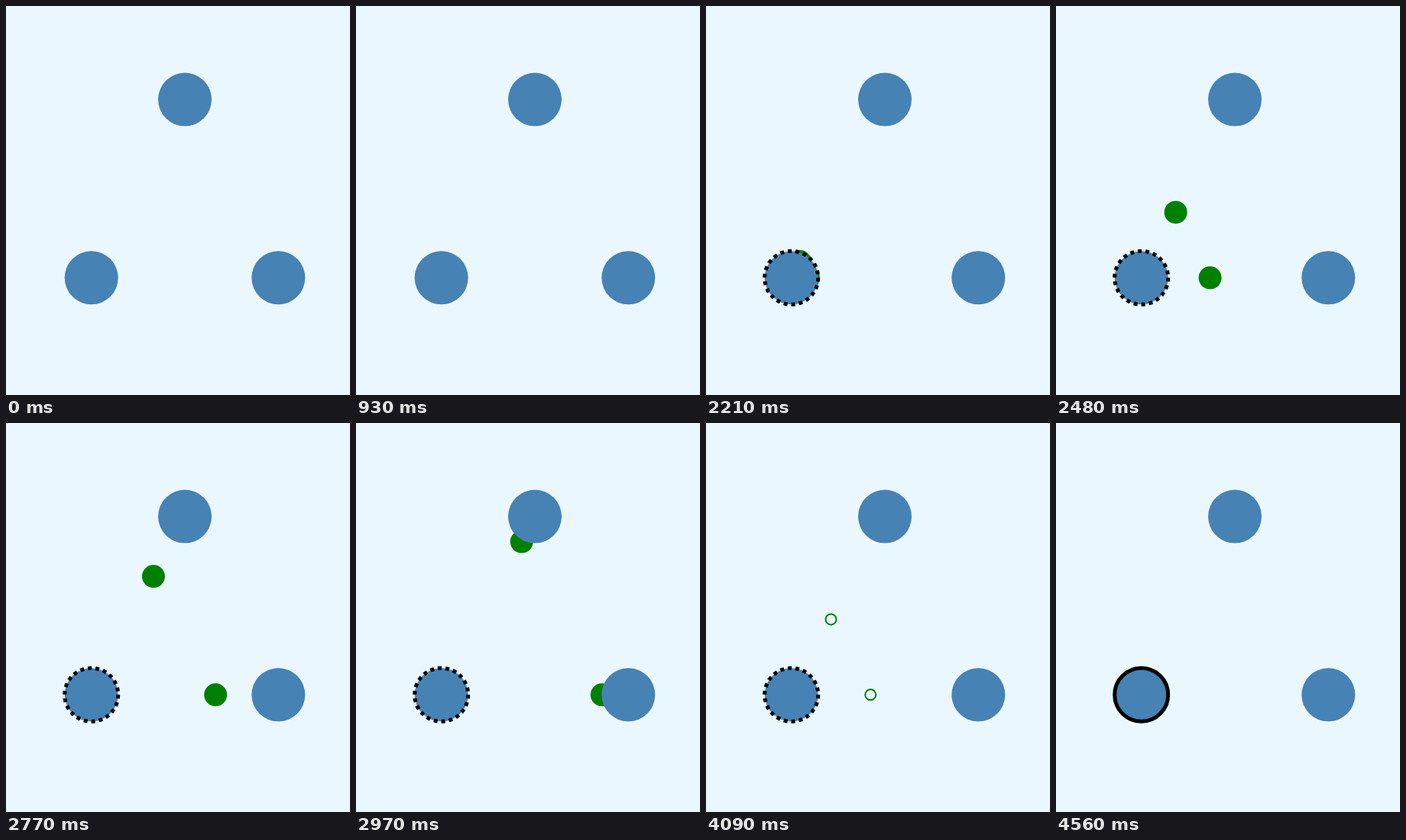
Recreate the animation shown at these times as an HTML page. Size 450 by 510 pixels, loop 6.65 s.

```html
<!DOCTYPE html>
<html lang="en">
<head>
<meta charset="utf-8">
<title>Leader election</title>
<style>
  html, body { margin: 0; width: 100%; height: 100%; overflow: hidden; background: #ebf7ff; }
  svg { display: block; }
  .node { fill: steelblue; stroke: black; stroke-width: 0; }
  .request { fill: green; }
  .reply { fill: none; stroke: green; stroke-width: 2; }
</style>
</head>
<body>
<svg id="stage" width="450" height="510" viewBox="0 0 450 510"></svg>
<script>
const LOOP = 6650;
const candidate = { x: 111.7, y: 356.3 };
const peers = [{ x: 234, y: 122.6 }, { x: 356.3, y: 356.3 }];

// [time in ms, share of the way travelled]
const requestTrack = [[2122, 0], [2210, 0.09], [2770, 0.663], [2870, 0.763], [3120, 1]];
const replyTrack = [[3536, 0], [3640, 0.108], [4090, 0.576], [4300, 0.743], [4560, 1]];
const ringStart = 915, ringEnd = 1170, electedAt = 4560;

const stage = document.getElementById("stage");

function addCircle(className, r, { x, y }) {
  const circle = document.createElementNS("http://www.w3.org/2000/svg", "circle");
  circle.setAttribute("class", className);
  circle.setAttribute("r", r);
  place(circle, x, y);
  return stage.appendChild(circle);
}

function place(circle, x, y) {
  circle.setAttribute("cx", x);
  circle.setAttribute("cy", y);
}

function progress(track, t) {
  const next = track.findIndex(([time]) => time > t);
  if (next < 1) return null;
  const [t0, p0] = track[next - 1], [t1, p1] = track[next];
  return p0 + (p1 - p0) * (t - t0) / (t1 - t0);
}

function easeInOutCubic(u) {
  return u < 0.5 ? 4 * u ** 3 : 1 - 4 * (1 - u) ** 3;
}

// Messages come first so that they pass beneath the nodes.
const messages = peers.flatMap(peer => [
  { circle: addCircle("request", 15, candidate), from: candidate, to: peer, track: requestTrack },
  { circle: addCircle("reply", 7, peer), from: peer, to: candidate, track: replyTrack }
]);
peers.forEach(peer => addCircle("node", 35, peer));
const ring = addCircle("node", 35, candidate);

function draw(t) {
  for (const { circle, from, to, track } of messages) {
    const p = progress(track, t);
    circle.style.display = p === null ? "none" : "";
    place(circle, from.x + (to.x - from.x) * p, from.y + (to.y - from.y) * p);
  }
  const grown = Math.min(1, Math.max(0, (t - ringStart) / (ringEnd - ringStart)));
  ring.style.strokeWidth = 5 * easeInOutCubic(grown);
  ring.style.strokeDasharray = t < electedAt ? "5 5" : "none";
}

function tick() {
  draw(performance.now() % LOOP);
  requestAnimationFrame(tick);
}
tick();
</script>
</body>
</html>
```
